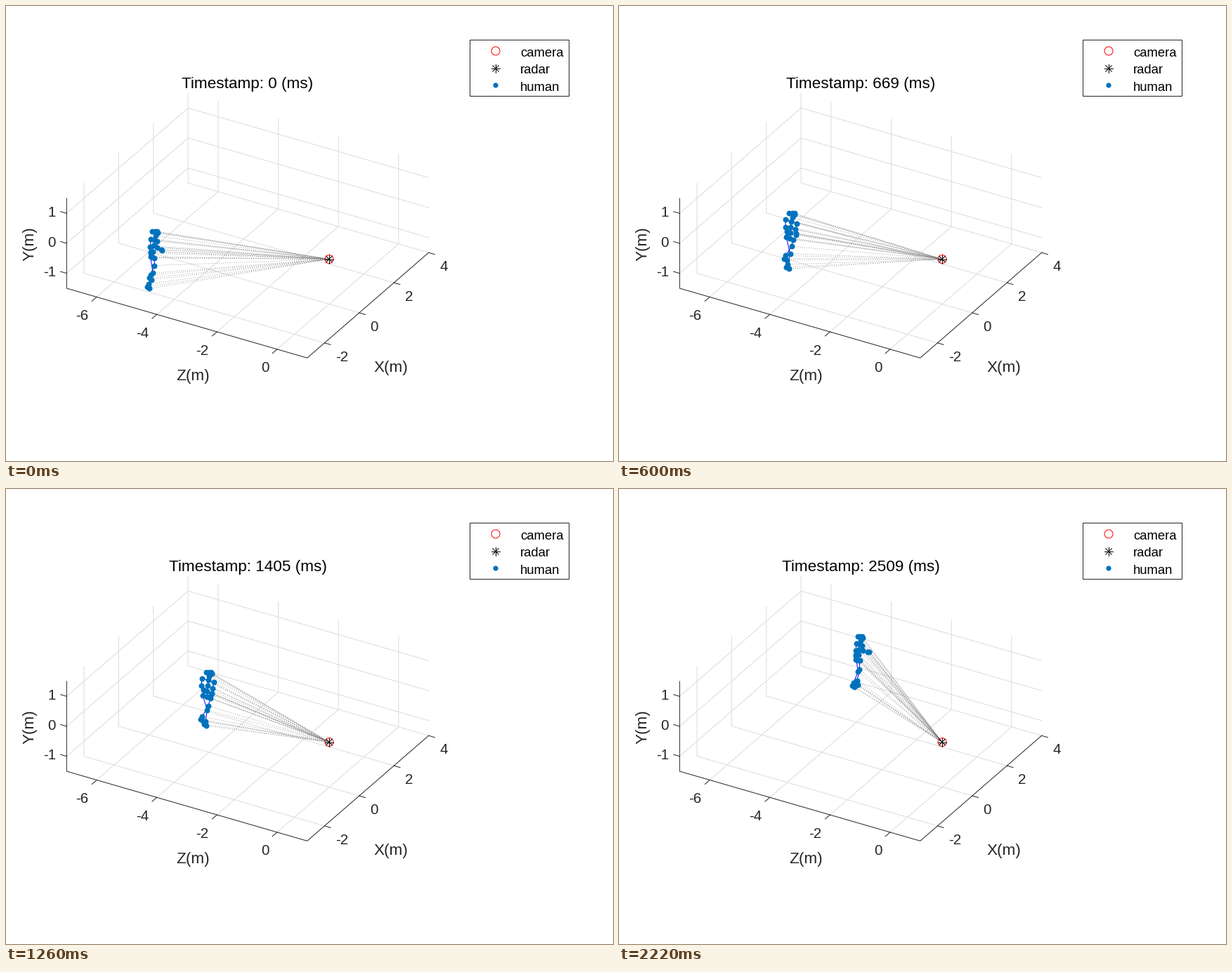
Recreate the animation shown at these times as a matplotlib script. Size 864 by 648 pixels, loop 2250 ms.

```python
import numpy as np
import matplotlib.pyplot as plt
from matplotlib.animation import FuncAnimation
from matplotlib.collections import LineCollection
from matplotlib.patches import Circle, Rectangle

W, H, DPI = 864, 648, 100
PX = 72 / DPI
FRAMES, STEP_MS = 75, 30
TICK_MS = 33.456
INK, BLUE = "#262626", "#0072BD"

plt.rcParams["font.family"] = "Liberation Sans"
fig = plt.figure(figsize=(W / DPI, H / DPI), dpi=DPI, facecolor="white")
ax = fig.add_axes([0, 0, 1, 1])
ax.set_xlim(0, W)
ax.set_ylim(H, 0)
ax.axis("off")


def vec(x, y):
    return np.array([x, y], float)


def project(x, y, z):
    return vec(460 + 24.7 * x + 42.8 * z,
               360.5 - 21.43 * x + 12.4 * z - 42.7 * y)


def line(points, color=INK, width=1.0, **kw):
    xs, ys = zip(*points)
    ax.plot(xs, ys, color=color, lw=width * PX, **kw)


def label(x, base, text, size, color=INK, ha="center", **kw):
    kw.setdefault("va", "baseline")
    return ax.text(x, base, text, fontsize=size * PX, color=color, ha=ha, **kw)


# Grid, axes and ticks
X0, X1, Y0, Y1, Z0, Z1 = -3, 4, -1.5, 1.5, -7, 1


def grid(*corners):
    line([project(*c) for c in corners], "#dcdcdc", 1, zorder=1)


def tick(point, direction):
    line([point, point + 9 * direction / np.hypot(*direction)], zorder=2)


for i, x in enumerate((-2, 0, 2, 4)):
    grid((x, Y1, Z0), (x, Y0, Z0), (x, Y0, Z1))
    tick(project(x, Y0, Z1), vec(42.8, 12.4))
    label(469 + 49.4 * i, 505.5 - 42.8 * i, str(x), 20.5, ha="left")
for i, z in enumerate((-6, -4, -2, 0)):
    grid((X1, Y1, z), (X1, Y0, z), (X0, Y0, z))
    tick(project(X0, Y0, z), vec(-24.7, 21.43))
    label(117.5 + 85.6 * i, 447 + 24.8 * i, str(z), 20.5, ha="right")
for y in (-1, 0, 1):
    grid((X0, y, Z0), (X1, y, Z0), (X1, y, Z1))
    tick(project(X0, y, Z0), vec(-42.8, -12.4))
    label(71, 342.7 - 42.7 * y, str(y), 20.5, ha="right")
line([project(*c) for c in ((X0, Y1, Z0), (X0, Y0, Z0),
                            (X0, Y0, Z1), (X1, Y0, Z1))], zorder=2)

label(266.3, 533.5, "Z(m)", 22.5)
label(547.5, 521.5, "X(m)", 22.5)
label(34, 338.5, "Y(m)", 22.5, rotation=90, va="center")
title = label(344, 117, "", 22.5, "black")


# Sensors and legend
def camera(x, y):
    ax.add_patch(Circle((x, y), 6, fill=False, ec="red", lw=PX, zorder=6))


def radar(x, y):
    for a in np.radians((0, 45, 90, 135)):
        d = 6 * vec(np.cos(a), np.sin(a))
        line([(x, y) - d, (x, y) + d], "black", 1, zorder=6)


SENSOR = project(0, 0, 0)
camera(*SENSOR)
radar(*SENSOR)
ax.add_patch(Rectangle((659.5, 47.5), 141, 80, fc="white", ec=INK, lw=PX))
camera(697, 64)
radar(697, 89)
ax.add_patch(Circle((697, 113), 3.6, fc=BLUE, lw=0))
for i, name in enumerate(("camera", "radar", "human")):
    label(732, 71.5 + 24.7 * i, name, 18.5, "black", ha="left")


# Walker: hips follow a short route, limbs swing with the stride
LAST, STRIDE = 75, 24
ROUTE_T = (0, 6, 20, 51, LAST)
ROUTE_X = (208.5, 211.5, 243, 303, 340)
ROUTE_Y = (358, 351.5, 331, 281.5, 243.5)
FACE = ((-4.5, -1), (-0.5, -1.5), (2.5, -1), (3.2, 1), (0, 4.8))


def mix(a, b, u):
    return a + (b - a) * u


def stride(t, peak):
    a = 2 * np.pi * (t - peak) / STRIDE
    return np.cos(a), np.sin(a)


def arm(shoulder, side, t):
    swing, _ = stride(t, 4 if side > 0 else 16)
    if side > 0:
        elbow = shoulder + vec(-1 + 2 * swing, 8.5)
        wrist = elbow + vec(4 + 6 * swing, 6 - 4 * swing)
    else:
        elbow = shoulder + vec(-0.5, 11)
        wrist = elbow + vec(2 + 2 * swing, 8 - swing)
    return [shoulder, elbow, mix(elbow, wrist, 0.75), wrist]


def leg(hip, side, t):
    lift, reach = stride(t, 22 if side > 0 else 34)
    knee = vec(1.5 + side, 16.5 - 6 * lift)
    ankle = vec(-4 + 3 * reach, 33.5 - 7.2 * lift - 3.8 * lift**2)
    return [hip, knee, ankle, ankle + (1.3, 6.3), ankle + (-2, 4)]


def pose(t):
    """Return all joints and the bones between them."""
    root = vec(np.interp(t, ROUTE_T, ROUTE_X), np.interp(t, ROUTE_T, ROUTE_Y))
    scale = 1.03 - 0.1 * t / LAST
    half = (4.5 + 4.5 * np.sin(np.pi * t / LAST)) * vec(1, 0.33)

    face = [vec(4, -34.5) + f for f in FACE]
    neck, base = vec(2, -24), vec(0, 0)
    spine = [mix(neck, base, u) for u in (0, 0.33, 0.66, 1)]
    joints = face + spine
    bones = [face, [face[-1]] + spine]
    for side in (-1, 1):
        a = arm(neck + side * half, side, t)
        b = leg(base + 0.6 * side * half, side, t)
        joints += a + b
        bones += [[neck] + a, [base] + b[:4], [b[2], b[4]]]

    def place(points):
        return root + scale * np.array(points)

    return place(joints), [place(b) for b in bones]


rays = LineCollection([], colors="#707070", linewidths=0.6 * PX,
                      linestyles=[(0, (1.7, 3.4))], zorder=3)
limbs = LineCollection([], colors="#0000ff", linewidths=PX, zorder=4)
ax.add_collection(rays, autolim=False)
ax.add_collection(limbs, autolim=False)
dots, = ax.plot([], [], "o", color=BLUE, ms=8 * PX, mew=0, zorder=5)


def draw(i):
    # The recording drops one sample late in the walk
    t = i + (i >= 69)
    joints, bones = pose(t)
    title.set_text(f"Timestamp: {round(t * TICK_MS)} (ms)")
    rays.set_segments([[j, SENSOR] for j in joints])
    limbs.set_segments(bones)
    dots.set_data(joints[:, 0], joints[:, 1])
    return title, rays, limbs, dots


anim = FuncAnimation(fig, draw, frames=FRAMES, interval=STEP_MS,
                     repeat=True, repeat_delay=0, blit=False)
plt.show()
```
